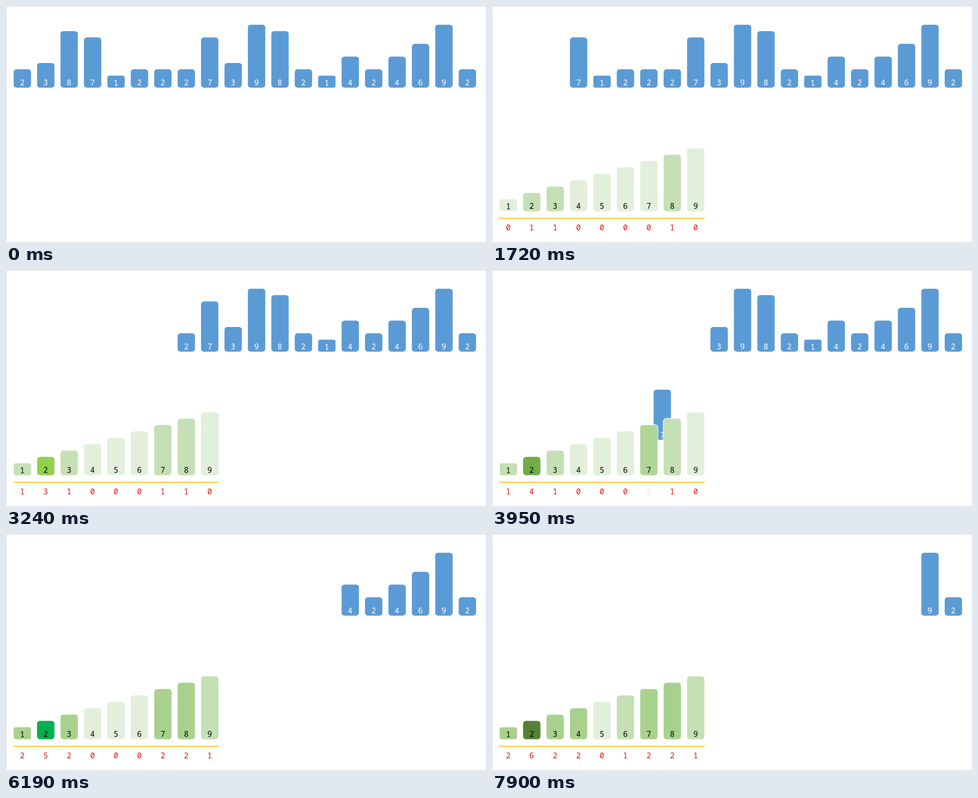
An HTML page with a canvas for the animation above (8000 ms loop, 1065 by 526 pixels).

```html
<!DOCTYPE html>
<html lang="en">
<head>
<meta charset="utf-8">
<title>Counting sort</title>
<style>
  html, body { margin: 0; width: 100%; height: 100%; overflow: hidden; background: #fff; }
  canvas { display: block; }
</style>
</head>
<body>
<canvas id="stage" width="1065" height="526"></canvas>
<script>
const ctx = document.getElementById('stage').getContext('2d');
const LOOP = 8000, MOVE = 250, FADE_START = 230, FADE = 100;
const STEP = 101.6, STEP_SHIFT = 27;
const LEFT = 17, PITCH = 51.97, BAR = 38.5;
const TOP_BASE = 182, BUCKET_BASE = 457.5, COUNT_BASE = 500;
const BLUE = '#5b9bd5', RED = '#e8120c', GOLD = '#fac010', EDGE = '#d9d9d9';

const values = [...'23871222739821424692'].map(Number);

// Bucket shade for each count
const shades = ['e2efda', 'c5e0b4', 'a9d18e', '92d050', '70ad47', '00b050', '548235']
  .map(hex => hex.match(/../g).map(c => parseInt(c, 16)));

// Key points of the pace: [item, ms at which it leaves]
const pace = [[0, 500], [4, 2180], [8, 3757], [11, 5022], [13, 5892],
              [14, 6380], [16, 7122], [17, 7610], [18, LOOP]];

const clamp = v => Math.max(0, Math.min(1, v));
const lerp = (a, b, p) => a + (b - a) * p;
const mix = (a, b, p) => `rgb(${a.map((v, i) => Math.round(lerp(v, b[i], p)))})`;
const barX = i => LEFT + PITCH * i;
const barHeight = n => 12.5 + 14.2 * n;

function startOf(i) {
  const k = pace.findIndex(([item]) => item >= i);
  if (k < 0) return LOOP;
  if (k === 0) return pace[0][1];
  const [i0, t0] = pace[k - 1], [i1, t1] = pace[k];
  return lerp(t0, t1, (i - i0) / (i1 - i0));
}
const starts = values.map((_, i) => startOf(i));
const progress = (i, t) => clamp((t - starts[i]) / MOVE);

// The picture advances in even steps
const heldTime = t => Math.floor((t + STEP_SHIFT) / STEP) * STEP - STEP_SHIFT;

function write(text, x, y, color, alpha = 1) {
  if (alpha <= 0) return;
  ctx.save();
  ctx.globalAlpha *= alpha;
  ctx.fillStyle = color;
  ctx.fillText(text, x, y);
  ctx.restore();
}

function drawBar(n, x, base, fill, ink) {
  const h = barHeight(n), r = Math.min(BAR, h) / 6;
  ctx.beginPath();
  ctx.roundRect(x - 0.75, base - h - 0.75, BAR + 1.5, h + 1.5, r + 0.75);
  ctx.strokeStyle = '#fff';
  ctx.lineWidth = 1.5;
  ctx.stroke();
  ctx.beginPath();
  ctx.roundRect(x, base - h, BAR, h, r);
  ctx.fillStyle = fill;
  ctx.fill();
  write(n, x + BAR / 2 - 0.2, base - 3.2 - 0.29 * r, ink);
}

function drawBucket(n, t) {
  const arrivals = values.map((v, i) => v === n ? progress(i, t) : 0).filter(p => p > 0);
  const count = arrivals.length, p = count ? arrivals[count - 1] : 1;
  const before = Math.max(0, count - 1);
  const x = barX(n - 1), mid = x + BAR / 2 - 0.2;
  drawBar(n, x, BUCKET_BASE, mix(shades[before], shades[count], p), '#000');
  write(before, mid, COUNT_BASE, RED, 1 - p / 0.35);
  write(count, mid, COUNT_BASE, RED, clamp((p - 0.65) / 0.35));
}

function draw(t) {
  ctx.globalAlpha = 1;
  ctx.fillStyle = '#fff';
  ctx.fillRect(0, 0, 1065, 526);
  ctx.fillStyle = EDGE;
  ctx.fillRect(0, 0, 1065, 1);
  ctx.fillRect(0, 0, 1, 526);
  ctx.font = '17.2px "Noto Sans Mono", "DejaVu Sans Mono", monospace';
  ctx.textAlign = 'center';

  values.forEach((n, i) => {
    const p = progress(i, t);
    if (p === 1) return;
    drawBar(n, lerp(barX(i), barX(n - 1), p), lerp(TOP_BASE, BUCKET_BASE, p), BLUE, '#fff');
  });

  ctx.globalAlpha = clamp((t - FADE_START) / FADE);
  if (ctx.globalAlpha === 0) return;
  for (let n = 1; n <= 9; n++) drawBucket(n, t);
  ctx.fillStyle = GOLD;
  ctx.fillRect(16, 472, 456, 2);
}

const begin = performance.now();
function tick() {
  draw(heldTime((performance.now() - begin) % LOOP));
  requestAnimationFrame(tick);
}
tick();
</script>
</body>
</html>
```
